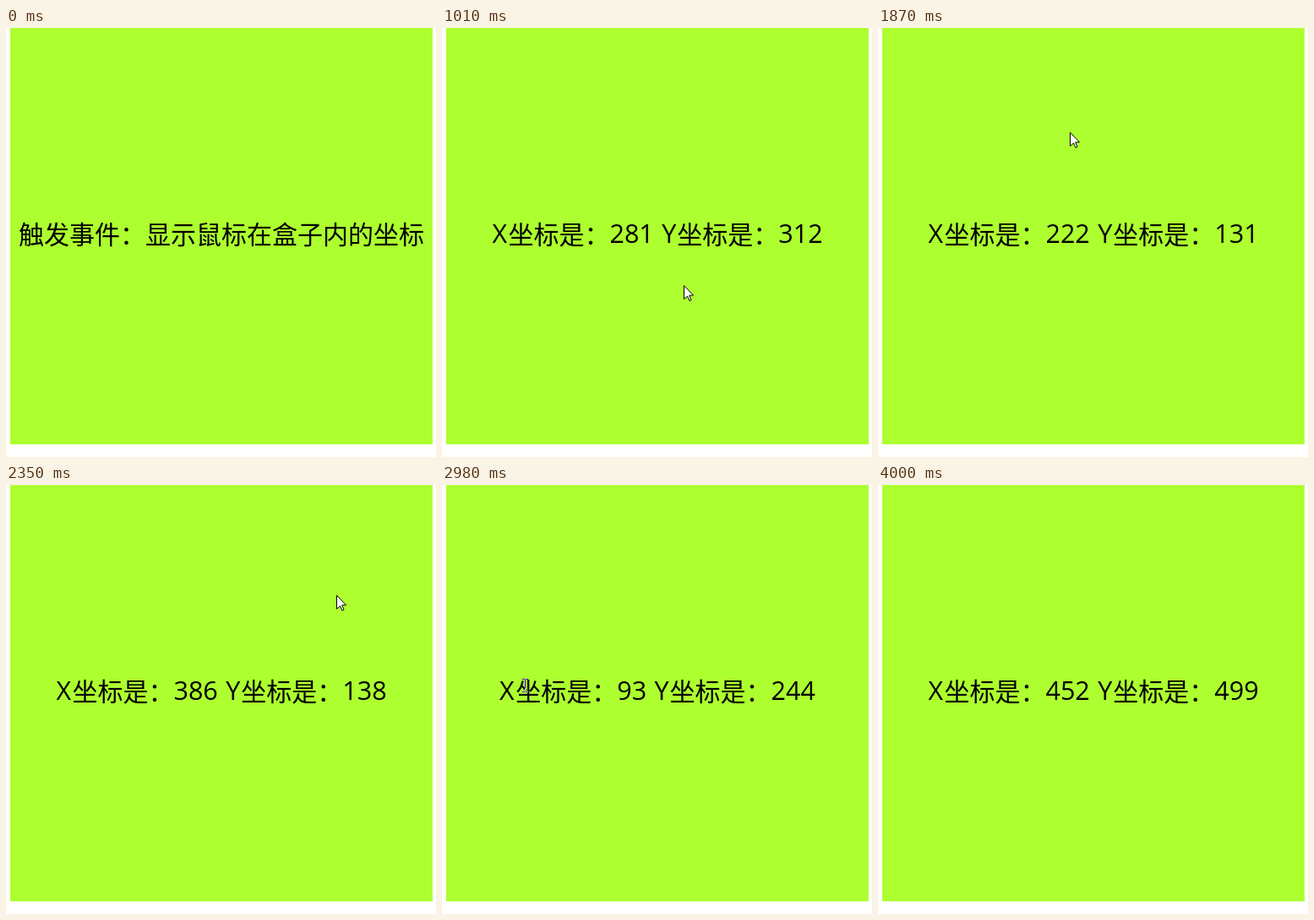
Animation of 509x507 px, one loop 4.54 s. Source, as an HTML page with a canvas:

```html
<!DOCTYPE html>
<html lang="zh-CN">
<head>
<meta charset="utf-8">
<title>鼠标坐标</title>
<style>
  html, body { margin: 0; width: 100%; height: 100%; overflow: hidden; background: #fff; }
  canvas { display: block; }
</style>
</head>
<body>
<canvas id="stage" width="509" height="507"></canvas>
<script>
const ctx = document.getElementById('stage').getContext('2d');
const LOOP = 4540, START = 220, STEP = 78.6;
const BOX = { x: 5, width: 500, height: 492 };
const CENTER = BOX.x + BOX.width / 2;
const HANZI = '300 30px "Noto Sans CJK SC", "Noto Sans CJK", sans-serif';
const LATIN = '30.5px "Open Sans", "Noto Sans", sans-serif';
const LAST_INSIDE = 44, GONE = 48;

// Mouse path: [step, x, y] in the coordinates the text reports.
const PATH = [
  [0, 266, 505], [6, 290, 341], [10, 281, 312], [12, 281, 312],
  [16, 199, 192], [19, 196, 150], [23, 270, 122], [27, 386, 138],
  [30, 240, 67], [33, 75, 87], [35, 93, 244], [37, 165, 350],
  [40, 351, 401], [44, 452, 499], [46, 466, 506], [47, 474, 513]
];

const ARROW = [[0, 0], [0, 16], [4, 12.5], [6.5, 18], [8.5, 17], [6.2, 11.5], [11, 11.5]];

function secant(i, axis) {
  const a = PATH[i], b = PATH[i + 1];
  return a && b ? (b[axis] - a[axis]) / (b[0] - a[0]) : 0;
}

// Harmonic slopes keep the curve from overshooting its turning points.
function slope(i, axis) {
  const before = secant(i - 1, axis), after = secant(i, axis);
  return before * after > 0 ? 2 * before * after / (before + after) : 0;
}

function coordinate(step, axis) {
  let i = PATH.findIndex(p => p[0] > step) - 1;
  if (i < 0) i = PATH.length - 2;
  const a = PATH[i], b = PATH[i + 1], span = b[0] - a[0];
  const u = (step - a[0]) / span, v = 1 - u;
  return Math.round(
    a[axis] * v * v * (1 + 2 * u) + b[axis] * u * u * (3 - 2 * u) +
    span * u * v * (slope(i, axis) * v - slope(i + 1, axis) * u));
}

const mouseAt = step => ({ x: coordinate(step, 1), y: coordinate(step, 2) });

function drawLine(runs) {
  const width = run => {
    ctx.font = run.font;
    return ctx.measureText(run.text).width + run.gap;
  };
  const total = runs.reduce((sum, run) => sum + width(run), 0);
  let x = CENTER - total / 2;
  ctx.fillStyle = '#000';
  for (const run of runs) {
    const advance = width(run);
    ctx.fillText(run.text, x, run.baseline);
    x += advance;
  }
  return total;
}

const hanzi = text => ({ text, font: HANZI, baseline: 255, gap: 0 });
const latin = (text, gap = 0) => ({ text, font: LATIN, baseline: 254, gap });

function drawMessage(step) {
  if (step < 1) return drawLine([hanzi('触发事件：显示鼠标在盒子内的坐标')]);
  const { x, y } = mouseAt(Math.min(step, LAST_INSIDE));
  return drawLine([
    latin('X', 1.5), hanzi('坐标是：'), latin(x + ' ', 1.5),
    latin('Y', 1), hanzi('坐标是：'), latin(String(y))
  ]);
}

function drawArrow(x, y) {
  ctx.beginPath();
  for (const [dx, dy] of ARROW) ctx.lineTo(x + dx + 0.5, y + dy + 0.5);
  ctx.closePath();
  ctx.fillStyle = '#fff';
  ctx.fill();
  ctx.strokeStyle = '#000';
  ctx.lineWidth = 1;
  ctx.stroke();
}

// The text cursor inverts whatever lies below it.
function drawBeam(x, y) {
  ctx.globalCompositeOperation = 'difference';
  ctx.fillStyle = '#fff';
  ctx.fillRect(x, y - 6, 1, 14);
  for (const edge of [y - 7, y + 8]) {
    ctx.fillRect(x - 3, edge, 3, 1);
    ctx.fillRect(x + 1, edge, 3, 1);
  }
  ctx.globalCompositeOperation = 'source-over';
}

function drawFrame(now) {
  const step = Math.floor((now % LOOP - START) / STEP + 0.06);
  ctx.fillStyle = '#fff';
  ctx.fillRect(0, 0, 509, 507);
  ctx.fillStyle = '#adff2f';
  ctx.fillRect(BOX.x, 0, BOX.width, BOX.height);
  const textWidth = drawMessage(step);
  if (step >= 0 && step < GONE) {
    const mouse = mouseAt(step), x = mouse.x + 5, y = mouse.y - 8;
    const overText = Math.abs(x - CENTER) < textWidth / 2 && Math.abs(y - 244) < 20;
    (overText ? drawBeam : drawArrow)(x, y);
  }
}

const origin = performance.now();
function tick() {
  drawFrame(performance.now() - origin);
  requestAnimationFrame(tick);
}
tick();
</script>
</body>
</html>
```
